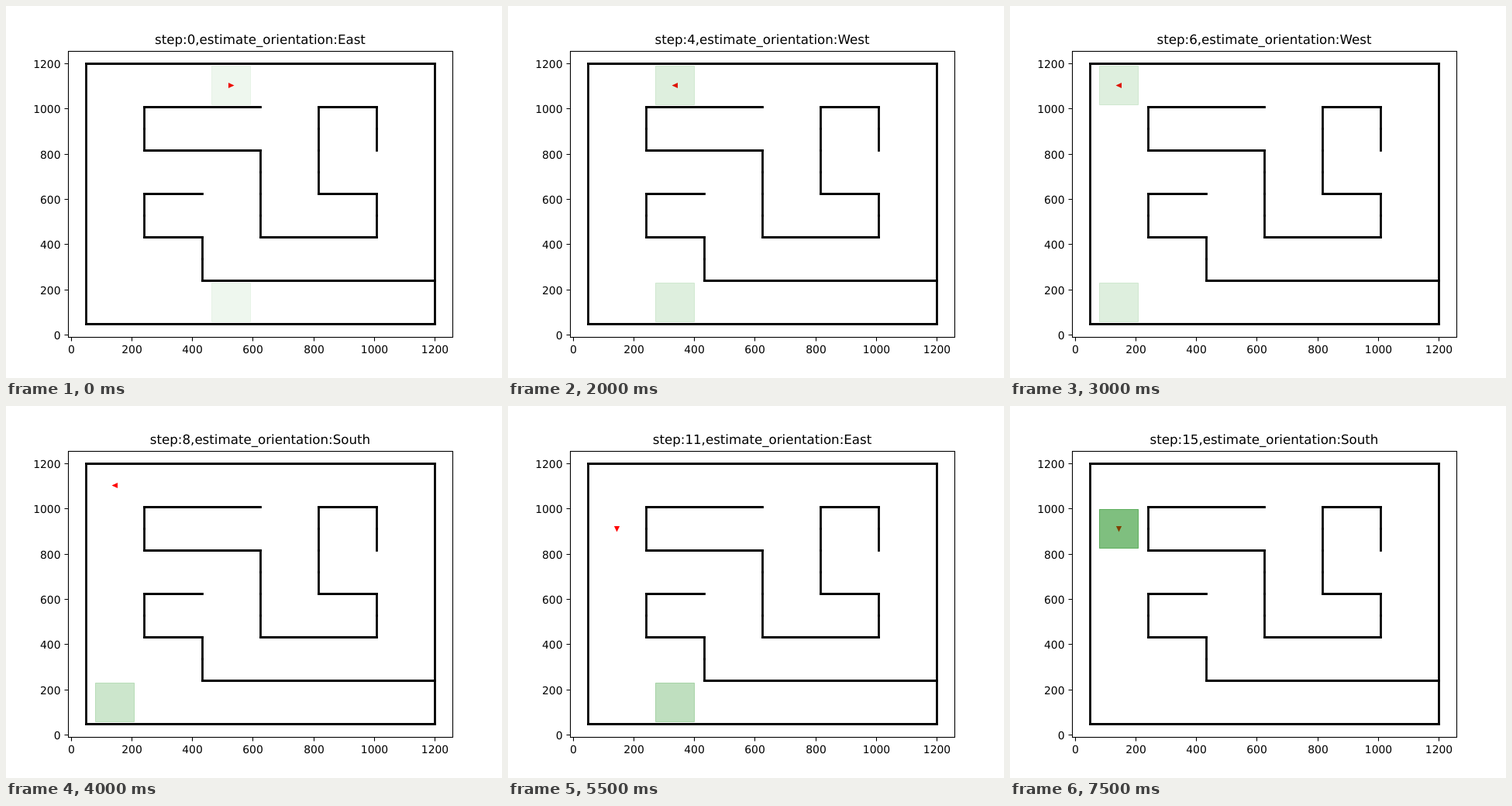
An HTML page for the animation above (8500 ms loop, 640 by 480 pixels).

```html
<!DOCTYPE html>
<html>
<head>
<meta charset="utf-8">
<style>
html, body { margin: 0; width: 100%; height: 100%; overflow: hidden; background: #fff; }
svg { display: block; }
text { font-family: "DejaVu Sans", sans-serif; font-size: 13.89px; text-rendering: geometricPrecision; }
#title { font-size: 16.67px; text-anchor: middle; }
.axis { fill: none; stroke: #000; stroke-width: 1.1; }
.wall { stroke: #000; stroke-width: 2.78; stroke-linecap: square; }
#belief rect { fill: green; stroke: green; }
</style>
</head>
<body>
<svg width="640" height="480" viewBox="0 0 640 480">
  <g id="plot"></g>
  <path id="robot" d="M4 0L-3.5 -3.6V3.6Z" fill="red"/>
  <g id="belief"></g>
  <text id="title" x="328" y="49"></text>
</svg>
<script>
const $ = id => document.getElementById(id);
const NS = 'http://www.w3.org/2000/svg';

function add(parent, tag, attrs, text = '') {
  const el = document.createElementNS(NS, tag);
  for (const name in attrs) el.setAttribute(name, attrs[name]);
  el.textContent = text;
  parent.append(el);
}

const plot = $('plot');
const snap = v => Math.floor(v) + 0.5;

// Axes with ticks
add(plot, 'rect', { x: 80.5, y: 58.5, width: 496, height: 369, class: 'axis' });
for (let i = 0; i <= 6; i++) {
  const x = snap(84.2 + i * 78.22), y = snap(424.6 - i * 58.34);
  add(plot, 'path', { d: `M${x} 428v4.5M80 ${y}h-4.5`, class: 'axis' });
  add(plot, 'text', { x, y: 448, 'text-anchor': 'middle' }, i * 200);
  add(plot, 'text', { x: 70.5, y: y + 5.2, 'text-anchor': 'end' }, i * 200);
}

// Maze: walls run between grid points, 12 by 12 half cells
const gridX = c => snap(103.5 + c * 37.5), gridY = r => 74.5 + r * 28;
const wall = (c1, r1, c2, r2) => add(plot, 'line', {
  x1: gridX(c1), y1: gridY(r1), x2: gridX(c2), y2: gridY(r2), class: 'wall'
});
[[0, 0, 12, 0], [12, 0, 12, 12], [0, 12, 12, 12], [0, 0, 0, 12]].forEach(w => wall(...w));

const routes = [
  [[6, 2], [2, 2], [2, 4], [6, 4], [6, 8], [10, 8], [10, 6], [8, 6], [8, 2], [10, 2], [10, 4]],
  [[4, 6], [2, 6], [2, 8], [4, 8], [4, 10], [12, 10]]
];
for (const route of routes) {
  for (let i = 1; i < route.length; i++) {
    let [c, r] = route[i - 1];
    const [endC, endR] = route[i];
    const dc = Math.sign(endC - c), dr = Math.sign(endR - r);
    while (c !== endC || r !== endR) wall(c, r, c += dc, r += dr);
  }
}

// Each step: heading, estimate, robot [column, row], opacity, believed places
const both = c => [[c, 0], [c, 10]];
const steps = [
  ['E', 'East', [4, 0], 0.065, both(4)],
  ['N', 'North', [4, 0], 0.09, both(4)],
  ['W', 'West', [4, 0], 0.13, both(4)],
  ...[3, 2, 1, 0].map(c => ['W', 'West', [c, 0], 0.13, both(c)]),
  ['N', 'West', [0, 0], 0.18, [[0, 10]]],
  ['W', 'South', [0, 0], 0.2, [[0, 10]]],
  ...[0, 1, 2].map(n => ['S', 'East', [0, n], 0.25, [[n, 10]]]),
  ['E', 'North', [0, 2], 0.25, [[2, 10]]],
  ['N', 'West', [0, 2], 0.25, [[2, 10]]],
  ['W', 'West', [0, 2], 0.5, [[0, 2]]],
  ['S', 'South', [0, 2], 0.5, [[0, 2]]]
];
const centerX = c => 140.5 + c * 37.5, centerY = r => 102.5 + r * 28;

function show(n) {
  const [heading, estimate, [c, r], opacity, places] = steps[n];
  $('title').textContent = `step:${n},estimate_orientation:${estimate}`;
  const angle = 'ESWN'.indexOf(heading) * 90;
  $('robot').setAttribute('transform', `translate(${centerX(c)} ${centerY(r)}) rotate(${angle})`);
  $('belief').replaceChildren();
  for (const [pc, pr] of places) {
    add($('belief'), 'rect', {
      x: snap(centerX(pc) - 25), y: centerY(pr) - 25, width: 50, height: 50,
      'fill-opacity': opacity, 'stroke-opacity': opacity
    });
  }
}

const start = performance.now();
let shown = -1;
function tick() {
  const t = (performance.now() - start) % 8500;
  const n = Math.min(15, Math.floor(t / 500));
  if (n !== shown) show(shown = n);
  requestAnimationFrame(tick);
}
tick();
</script>
</body>
</html>
```
